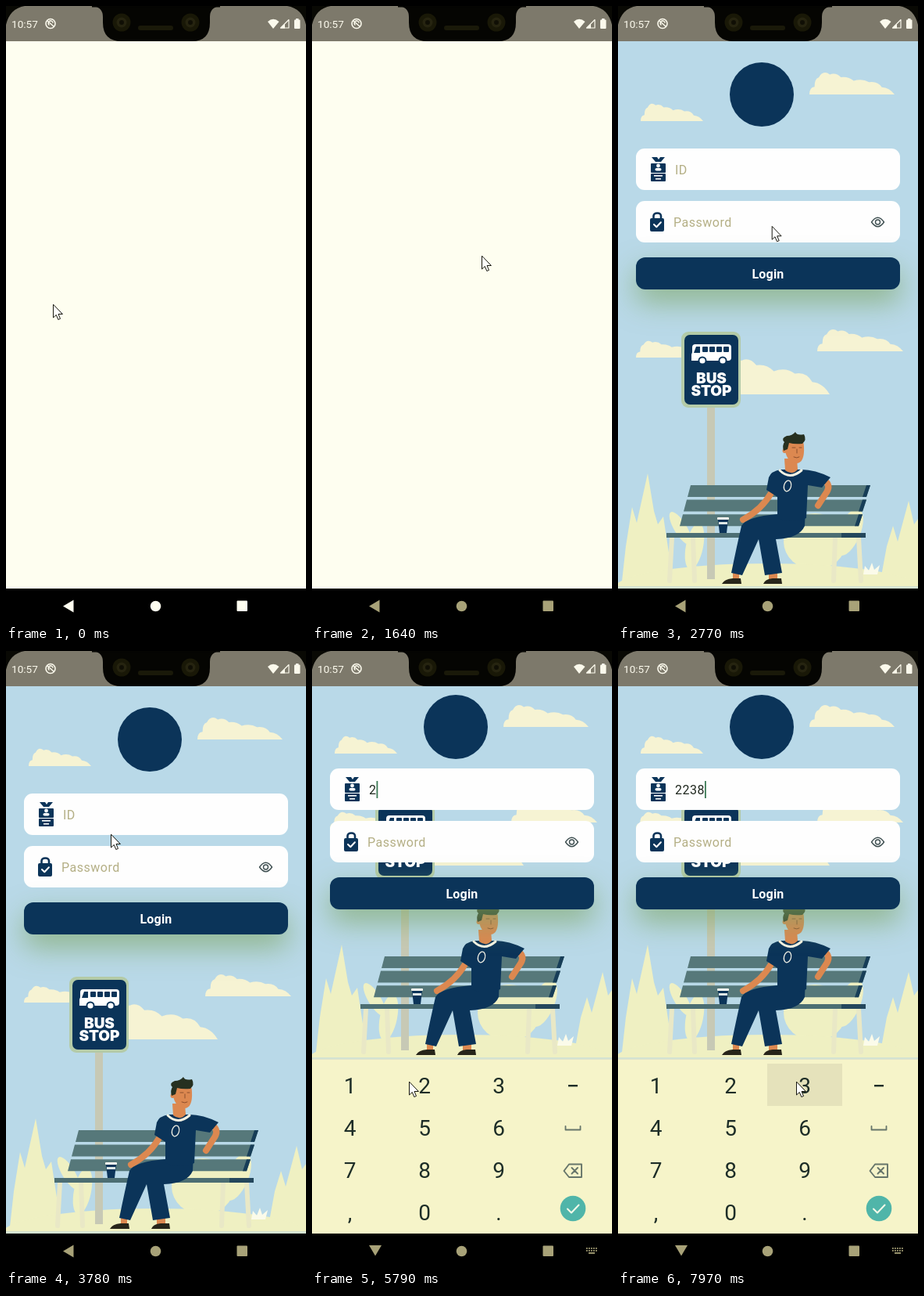
An HTML page with a canvas that plays this animation: 384 by 788 pixels, repeating every 8000 ms.

```html
<!DOCTYPE html>
<html lang="en">
<head>
<meta charset="utf-8">
<title>Bus login</title>
<style>
html, body { margin: 0; width: 100%; height: 100%; overflow: hidden; background: #fefef0; }
canvas { display: block; width: 384px; height: 788px; }
</style>
</head>
<body>
<canvas id="stage" width="384" height="788"></canvas>
<script>
const g = document.getElementById('stage').getContext('2d');
const LOOP = 8000, NAVY = '#0b3459', SKY = '#b9d9e8', CREAM = '#f6f3d3', LEAF = '#eff0c2', SKIN = '#dc8850';
const FONT = 'Roboto, sans-serif';
const PAGE_IN = 2350, KEYS_IN = 4120;

const clamp = v => Math.max(0, Math.min(1, v));
const span = (t, a, b) => clamp((t - a) / (b - a));
const easeOut = (u, p = 3) => 1 - Math.pow(1 - u, p);

// time, x, y of the pointer tip
const pointer = [
  [0, 60, 381], [40, 60, 381], [840, 120, 372], [1640, 217, 319], [2100, 217, 319], [2180, 218, 314],
  [2350, 218, 314], [2480, 218, 305], [3150, 165, 246], [3780, 134, 234], [4020, 98, 214],
  [4200, 94, 222], [4530, 92, 232], [4800, 92, 232], [5300, 126, 552], [5790, 124, 550],
  [6120, 124, 550], [6480, 226, 552], [6720, 228, 551], [7280, 146, 664], [7520, 146, 666],
  [7860, 228, 550], [8000, 228, 550]
];
// time of entry, digit, column, row
const typed = [[5480, '2', 1, 0], [6050, '2', 1, 0], [6650, '3', 2, 0], [7500, '8', 1, 2], [8030, '3', 2, 0]];

function poly(color, pts) {
  g.fillStyle = color;
  g.beginPath();
  pts.forEach(([x, y], i) => i ? g.lineTo(x, y) : g.moveTo(x, y));
  g.closePath();
  g.fill();
}
function shape(d, fill, stroke, width = 1) {
  const p = new Path2D(d);
  if (fill) { g.fillStyle = fill; g.fill(p); }
  if (stroke) {
    g.strokeStyle = stroke;
    g.lineWidth = width;
    g.lineCap = g.lineJoin = 'round';
    g.stroke(p);
  }
}
function rect(x, y, w, h, color, r = 0) {
  g.fillStyle = color;
  g.beginPath();
  g.roundRect(x, y, w, h, r);
  g.fill();
}
function oval(x, y, rx, ry, color, turn = 0) {
  g.fillStyle = color;
  g.beginPath();
  g.ellipse(x, y, rx, ry, turn, 0, 7);
  g.fill();
}
const disc = (x, y, r, color) => oval(x, y, r, r, color);
function text(s, x, y, size, color, { weight = 400, align = 'left', gap = 0, font = FONT } = {}) {
  g.font = `${weight} ${size}px ${font}`;
  g.textAlign = align;
  g.letterSpacing = gap + 'px';
  g.fillStyle = color;
  g.fillText(s, x, y);
}
function shifted(dy, draw) {
  g.save();
  g.translate(0, dy);
  draw();
  g.restore();
}

function cloud(x, y, w, h) {
  const bumps = [[0, .68, .06, .66], [.06, .3, .11, .25], [.16, -.1, .24, .12], [.31, .02, .37, .24],
    [.46, .2, .52, .4], [.62, .28, .7, .46], [.8, .4, .85, .68], [.94, .7, 1, 1]];
  g.fillStyle = CREAM;
  g.beginPath();
  g.moveTo(x, y + h);
  for (const [a, b, c, d] of bumps) g.quadraticCurveTo(x + a * w, y + b * h, x + c * w, y + d * h);
  g.fill();
}

function plants() {
  poly(LEAF, [[4, 744], [10, 690], [18, 640], [24, 660], [38, 597], [46, 645], [51, 662], [58, 652], [72, 744]]);
  poly(LEAF, [[334, 744], [344, 690], [352, 664], [358, 684], [372, 632], [379, 662], [384, 655], [384, 744]]);
  oval(80, 667, 8, 24, LEAF, -.55);
  oval(98, 690, 11, 30, LEAF, .2);
  oval(252, 684, 40, 36, LEAF);
  oval(296, 672, 14, 32, LEAF, .4);
  oval(190, 744, 195, 32, LEAF);
  poly('#fbfbea', [[314, 726], [316, 715], [321, 721], [325, 711], [328, 720], [335, 714], [332, 726]]);
  rect(0, 741, 384, 3, '#d4e3d2');
}

function busSign() {
  rect(114, 508, 10, 224, '#c7c9b5');
  rect(81, 416, 76, 97, '#b4cba8', 9);
  rect(85, 420, 69, 89, NAVY, 7);
  rect(95, 432, 50, 21, '#fff', 4);
  poly('#fff', [[99, 432], [94, 445], [94, 453], [110, 453], [110, 432]]);
  for (let i = 0; i < 4; i++) rect(108 + i * 9, 435, 7, 7, NAVY, 1);
  poly(NAVY, [[100, 435], [105, 435], [105, 443], [97, 443]]);
  for (const x of [108, 134]) { disc(x, 453, 5.5, NAVY); disc(x, 453, 3.6, '#fff'); }
  const style = { weight: 900, align: 'center', font: 'Inter, sans-serif' };
  text('BUS', 119.5, 482, 19, '#fff', style);
  text('STOP', 119.5, 498, 19, '#fff', style);
}

function bench() {
  for (const [x, lean] of [[69, -3], [96, 2], [278, -2], [308, 3]])
    shape(`M${x} 679L${x + lean} 734`, null, '#e9e8c6', 6);
  for (let i = 0; i < 3; i++) {
    const y = 612 + i * 18.6, l = 93 - i * 5, r = 323 - i * 5;
    poly('#56787a', [[l, y], [r, y], [r - 5, y + 15], [l - 4, y + 15]]);
    poly('#173d57', [[r - 5, y], [r, y], [r - 5, y + 15], [r - 10, y + 15]]);
  }
  rect(62, 673, 255, 6, '#4c6e73');
  rect(286, 673, 31, 6, '#24475c');
}

function cup() {
  poly(NAVY, [[128, 656], [141, 656], [139, 673], [130, 673]]);
  rect(127, 653, 15, 3, '#fbfaf0', 1);
  rect(129, 659, 11, 3, '#dfe7e5');
}

function sitter() {
  rect(147, 722, 8, 11, SKIN);
  rect(193, 722, 11, 11, SKIN);
  shape('M133 738Q136 732 147 731L157 731L158 738ZM186 738Q188 732 198 731L209 731L210 738Z', '#27251a');
  shape('M196 622Q184 643 160 656', null, SKIN, 8);
  shape('M266 607Q273 614 265 624L256 638', null, SKIN, 8);
  shape('M204 649Q165 652 158 664Q152 690 145 724L159 727L180 681L188 727L210 724L202 681Q232 680 239 664L240 640L206 642Z', NAVY);
  shape('M208 592Q196 594 193 602L190 618L204 627L204 654Q224 662 241 654L243 612L261 615L272 602Q252 592 235 592Z', NAVY);
  shape('M213 578L214 593Q223 600 230 592L229 578Z', SKIN);
  shape('M207 593Q220 606 235 593', null, '#f7f4e4', 3);
  shape('M214 560Q214 551 226 551Q238 551 238 563Q239 583 229 584Q216 582 214 568Z', SKIN);
  disc(213.5, 568, 3, SKIN);
  shape('M212 568Q210 561 213 557Q208 552 216 549Q223 549 227 544Q229 549 238 547Q242 554 236 559Q226 560 219 558L217 566Z', '#263020');
  shape('M223 564h4M232 564h3M229 566v5M225 576q4 2 7 0', null, '#8b4e2c', 1);
  g.strokeStyle = '#f0efe4';
  g.lineWidth = 1.3;
  g.beginPath();
  g.ellipse(217, 613, 4.5, 7, .25, 0, 7);
  g.stroke();
}

function scene() {
  cloud(255, 412, 110, 29);
  cloud(23, 427, 88, 22);
  cloud(122, 447, 149, 49);
  plants();
  busSign();
  bench();
  cup();
  sitter();
}

function badgeIcon() {
  poly(NAVY, [[43, 193], [50, 193], [52, 196], [54, 193], [60, 193], [55, 199], [48, 199]]);
  rect(42, 201, 19, 12, NAVY, 1);
  rect(42, 214, 19, 10, NAVY, 1);
  disc(51.5, 204, 2.4, '#fff');
  rect(47.5, 207, 8, 3.6, '#fff', 1.8);
  rect(46, 216, 11, 1.6, '#fff');
  rect(48, 220, 7, 1.6, '#fff');
}
function lockIcon() {
  shape('M45.5 273V268Q46 264.5 50.3 264.5Q54.7 264.5 55 268V273', null, NAVY, 2.6);
  rect(41, 271, 18, 17, NAVY, 2);
  shape('M46 279l3.3 3.3l5.6 -6', null, '#fff', 2);
}
function eyeIcon() {
  shape('M324.5 276Q332.5 264.5 340.5 276Q332.5 287.5 324.5 276Z', null, '#3d4e50', 1.4);
  g.beginPath();
  g.arc(332.5, 276, 3, 0, 7);
  g.stroke();
}

function form(t) {
  const entered = typed.filter(k => k[0] <= t);
  const value = entered.map(k => k[1]).join('');
  const hint = '#b4af85';
  rect(23, 182, 338, 53, '#fefefe', 11);
  rect(23, 249, 338, 53, '#fefefe', 11);
  badgeIcon();
  lockIcon();
  eyeIcon();
  text(value || 'ID', 73, 214.5, 16, value ? '#20281f' : hint, { gap: .5 });
  if (t >= KEYS_IN) {
    const last = entered.length ? entered[entered.length - 1][0] : KEYS_IN;
    if ((t - last) % 1000 < 500) rect(73 + value.length * 9.5, 198, 1.8, 22, '#3c7a55');
  }
  text('Password', 71, 281.5, 16, hint, { gap: .5 });

  g.save();
  g.shadowColor = 'rgba(128,168,108,.75)';
  g.shadowBlur = 36;
  g.shadowOffsetY = 16;
  rect(23, 321, 338, 41, NAVY, 12);
  g.restore();
  text('Login', 192, 347.5, 16, '#fff', { weight: 700, align: 'center', gap: .2 });
}

function page(t, lift) {
  g.save();
  g.beginPath();
  g.rect(0, 45, 384, 699);
  g.clip();
  rect(0, 45, 384, 699, SKY);
  shifted(-222 * lift, scene);
  shifted(-16 * lift, () => {
    cloud(245, 84, 109, 29);
    cloud(29, 124, 80, 23);
    disc(184, 113, 41, NAVY);
  });
  shifted(-32 * lift, () => form(t));
  g.restore();
}

function keyboard(t, lift) {
  const ink = '#1d2d27', soft = '#66756a', cols = [48.5, 144, 239, 334];
  g.save();
  g.beginPath();
  g.rect(0, 0, 384, 744);
  g.clip();
  g.translate(0, 223 * (1 - lift));
  rect(0, 521, 384, 224, '#f6f4c9');
  rect(0, 521, 384, 1, '#dfe4cc');
  const down = typed.find(k => t >= k[0] - 110 && t < k[0] + 40);
  if (down) rect(96 * down[2] - (down[2] > 1 ? 1 : 0), 527 + 54 * down[3], 96, 54, '#e5e2bb');
  ['123', '456', '789', ',0.'].forEach((row, r) =>
    [...row].forEach((c, i) => text(c, cols[i], 565 + 54 * r, 28, ink, { align: 'center' })));
  rect(328, 554, 12, 2.4, ink);
  shape('M324.5 607v4.5h19v-4.5', null, soft, 1.8);
  shape('M329 655.5H345V672H329L322.5 664ZM332.5 660l7.5 7.5M340 660l-7.5 7.5', null, soft, 1.9);
  disc(334, 712, 16.3, '#50b5a9');
  shape('M327 712.5l5 5l9.5 -10', null, '#fbfbea', 2);
  g.restore();
}

function statusBar() {
  const ink = '#fbf9ec';
  rect(0, 0, 384, 45, '#7d796b');
  shape('M0 0H24Q5 3 0 24ZM384 0H360Q379 3 384 24Z', '#090904');
  shape('M112 0Q124 2 124 14V21Q124 45 148 45H238Q261 45 261 21V14Q261 2 273 0Z', '#050502');
  rect(110, 0, 164, 1.5, '#050502');
  for (const x of [148, 236]) {
    disc(x, 21, 11.5, '#191807');
    disc(x, 21, 6.5, '#262410');
    disc(x, 21, 3, '#100f05');
  }
  rect(169, 25, 45, 6, '#1a1909', 3);
  text('10:57', 7, 28, 13.6, ink);
  g.strokeStyle = ink;
  g.lineWidth = 1.6;
  g.beginPath();
  g.arc(57, 22.5, 6, 0, 7);
  g.stroke();
  shape('M53 19l8 7M55 24a3 3 0 1 1 5 -3', null, ink, 1.5);
  shape('M335 20Q342 13.5 349.5 20L342 29Z', ink);
  shape('M351.5 28H362V17.5Z', null, ink, 1.2);
  shape('M351 28.5H357V23Z', ink);
  rect(369, 17.5, 7.5, 11.5, ink, 1);
  rect(371, 16, 3.5, 2, ink);
}

function navBar(t) {
  const u = span(t, 880, 1200), mix = (a, b) => Math.round(a + (b - a) * u);
  const ink = `rgb(${mix(255, 168)},${mix(254, 162)},${mix(240, 120)})`;
  rect(0, 744, 384, 44, '#000');
  if (t < KEYS_IN) poly(ink, [[73, 766.5], [86.5, 758.5], [86.5, 774.5]]);
  else {
    poly(ink, [[73, 759], [89, 759], [81, 772.5]]);
    for (let r = 0; r < 2; r++) for (let i = 0; i < 5; i++) rect(351 + i * 3, 762 + r * 3, 1.8, 1.8, ink);
    rect(354, 768, 8, 1.8, ink);
  }
  disc(191.5, 766.5, 6.8, ink);
  rect(295.5, 759.5, 13.5, 13.5, ink, 1);
}

function arrow(t) {
  const i = Math.max(1, pointer.findIndex(p => p[0] > t));
  const [a, x0, y0] = pointer[i - 1], [b, x1, y1] = pointer[i];
  const u = span(t, a, b), e = u * u * (3 - 2 * u);
  g.save();
  g.translate(x0 + (x1 - x0) * e + .5, y0 + (y1 - y0) * e + .5);
  shape('M0 0V16.5L3.8 13L6.3 19L9 17.9L6.5 12H11.5Z', '#fff', '#17170f', 1);
  g.restore();
}

function draw(t) {
  const u = span(t, PAGE_IN, PAGE_IN + 300);
  const lift = easeOut(span(t, KEYS_IN, KEYS_IN + 280));
  rect(0, 0, 384, 788, '#fefef0');
  if (t >= PAGE_IN) {
    const s = .85 + .15 * easeOut(u, 3.3);
    rect(0, 45, 384, 699, `rgba(180,170,80,${.42 * clamp(u * 3)})`);
    g.save();
    g.globalAlpha = clamp(u * 2.15);
    g.translate(192, 394);
    g.scale(s, s);
    g.translate(-192, -394);
    page(t, lift);
    // warm cast and outgoing mark clear as the page settles
    const veil = 1 - span(t, 2480, 2720);
    if (veil > 0) {
      rect(0, 45, 384, 699, `rgba(190,215,100,${.18 * veil})`);
      disc(194, 357, 47, `rgba(225,232,240,${.2 * veil})`);
    }
    g.restore();
  }
  if (lift > 0) keyboard(t, lift);
  statusBar();
  navBar(t);
  arrow(t);
}

const start = performance.now();
function tick() {
  draw((performance.now() - start) % LOOP);
  requestAnimationFrame(tick);
}
tick();
</script>
</body>
</html>
```
